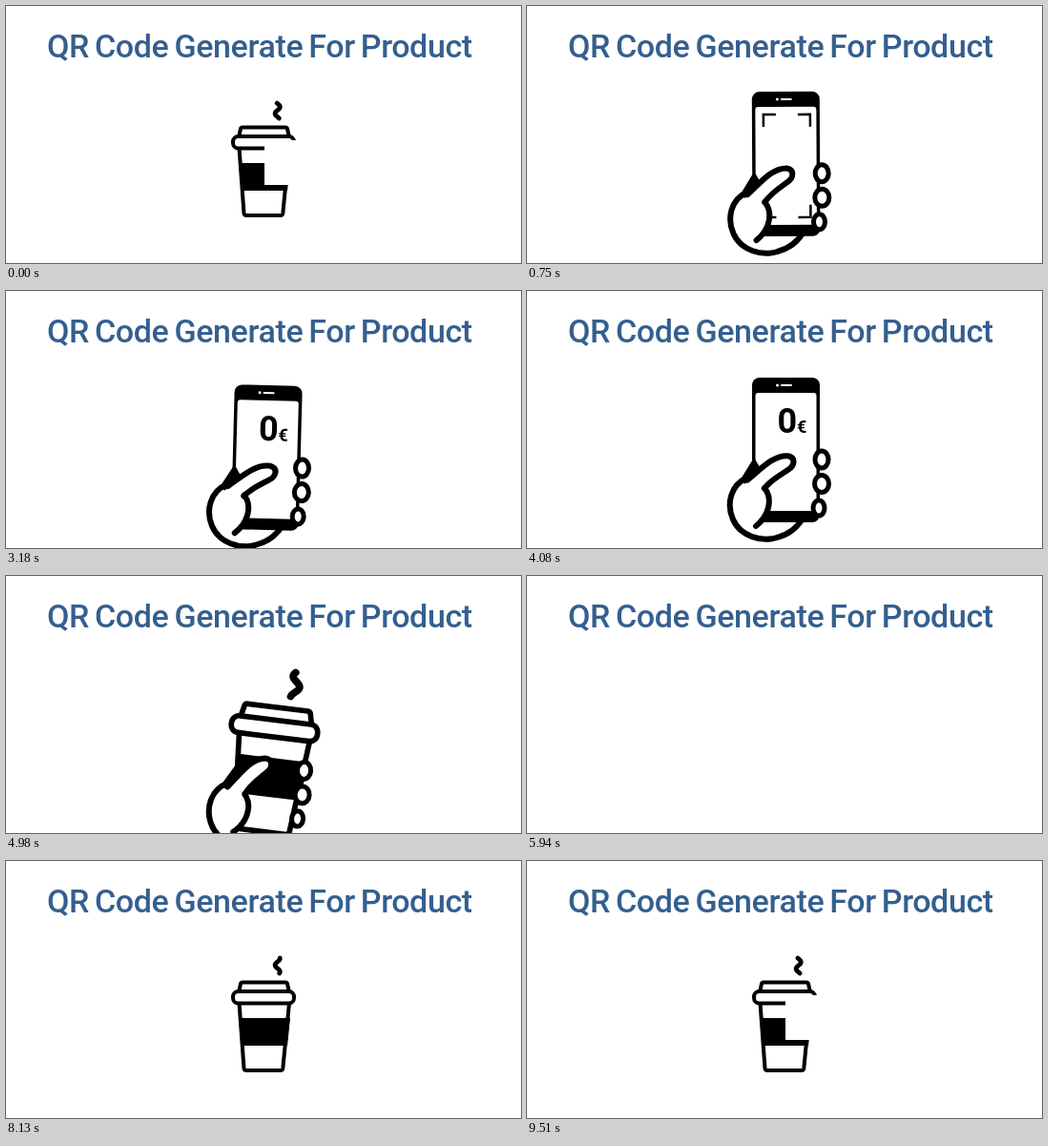
These frames come from a looping animation (540x270 px, 9.54 s). An HTML page:

```html
<!DOCTYPE html>
<html lang="en">
<head>
<meta charset="utf-8">
<title>QR Code Generate For Product</title>
<style>
  html, body { margin: 0; width: 100%; height: 100%; overflow: hidden; background: #fff; }
  svg { display: block; width: 540px; height: 270px; }
  .title { font: 500 34px Roboto, sans-serif; letter-spacing: -.4px; word-spacing: -2px; fill: #345f8f; }
  .price { font: 700 36px Roboto, sans-serif; }
  .price .unit { font-size: 18px; }
  .line { fill: none; stroke: #000; stroke-width: 4; stroke-linecap: round; stroke-linejoin: round; }
  .hand { stroke-width: 6; }
  .steam { stroke-width: 4.8; }
  .finger { stroke-width: 5; }
  .finder { stroke-width: 2.5; stroke-linecap: butt; stroke-linejoin: miter; }
  .white { fill: #fff; }
</style>
</head>
<body>
<svg viewBox="0 0 540 270">
  <defs>
    <clipPath id="stage"><rect y="80" width="540" height="190"/></clipPath>
    <g id="drink">
      <path class="line white" d="M244.500 149L249.500 218Q250 220 252 220H288Q290 220 290.300 218L297 149Z"/>
      <path d="M244 165H298L295 194H247Z"/>
      <path class="line white" d="M244 138L246 129Q246.500 127.500 248 127.500H293Q294.500 127.500 295 129L297 138Z"/>
      <rect class="line white" x="238" y="137" width="64" height="12.500" rx="5.500"/>
    </g>
  </defs>

  <text class="title" x="43" y="54">QR Code Generate For Product</text>

  <g clip-path="url(#stage)">
    <g id="cup">
      <use href="#drink"/>
      <path class="line steam"/>
      <rect id="label" class="white" x="271" y="141" width="46" height="47"/>
    </g>

    <g id="hand">
      <path class="line white hand" d="M231 200C213 208 209 228 216 244C224 262 246 268 262 263C274 260 283 253 289 243"/>
      <g id="phone">
        <rect x="236" y="95" width="71" height="152" rx="8"/>
        <rect class="white" x="239.500" y="111" width="64" height="124" rx="3"/>
        <circle class="white" cx="262.500" cy="103" r="1.500"/>
        <rect class="white" x="266" y="102" width="12" height="2" rx="1"/>
        <path id="finder" class="line finder" d="M248 132V119H261M284 119H297V132M297 214V227H284M261 227H248V214"/>
        <g id="price" class="price">
          <text x="262.500" y="153">0</text>
          <text class="unit" x="283" y="153">€</text>
        </g>
      </g>
      <g id="held" transform="translate(274.500 139) rotate(2.500) scale(1.420) translate(-270 -143)">
        <use href="#drink"/>
        <path class="line steam" transform="translate(-37 -14) scale(1.120)"/>
      </g>
      <path d="M238 179L222 205L236 208L247 194Z"/>
      <path class="white" d="M233 201L249 211C258 222 254 240 239 252L228 246L222 226L228 208Z"/>
      <path id="thumb" class="line white hand" d="M231 203C245 190 257 175 272 175.500C281 177 279 186 273 190C265 196 256 201 249 211"/>
      <path class="line hand" d="M249 211C258 222 254 240 240 251"/>
      <ellipse class="line white finger" cx="309" cy="181" rx="7" ry="9"/>
      <ellipse class="line white finger" cx="309" cy="206.500" rx="7.500" ry="9"/>
      <ellipse class="line white finger" cx="306" cy="232" rx="6" ry="8"/>
    </g>
  </g>
</svg>

<script>
const LOOP = 9540;
const SWAP = 4820; // the phone is out of view and becomes the drink
const EXIT = 5600;
const $ = id => document.getElementById(id);
const [cup, label, hand, phone, held, finder, price, thumb] =
  ['cup', 'label', 'hand', 'phone', 'held', 'finder', 'price', 'thumb'].map($);
const steams = document.querySelectorAll('.steam');

const part = (t, a, b) => Math.min(1, Math.max(0, (t - a) / (b - a)));
const ease = (t, a, b) => (1 - Math.cos(Math.PI * part(t, a, b))) / 2;
const pulse = (t, a, b) => Math.sin(Math.PI * part(t, a, b));

// Damped swing from 1 to 0 with one small overshoot.
function settle(t, a, b) {
  const p = part(t, a, b);
  return p < 1 ? Math.exp(-7.5 * p) * Math.cos(2.5 * Math.PI * p) : 0;
}

const move = (el, value) => el.setAttribute('transform', value);
const show = (el, on) => el.style.display = on ? '' : 'none';
const scaleAt = (x, y, s, dy = 0) => `translate(${x} ${y + dy}) scale(${s}) translate(${-x} ${-y})`;

function steamPath(t) {
  let d = '';
  for (let y = 102; y <= 118; y++) {
    const x = 284.7 + 2.6 * Math.sin(2 * Math.PI * ((y - 102.5) / 14 + 5 * t / LOOP));
    d += `${d ? 'L' : 'M'}${x.toFixed(2)} ${y}`;
  }
  return d;
}

// How far the hand is out of view: 0 in place, 1 below the stage.
function handAway(t) {
  if (t < 4650) return settle(t, 30, 1560);
  if (t < SWAP) return ease(t, 4650, SWAP);
  return t < EXIT ? settle(t, SWAP, 5720) : ease(t, EXIT, 5940);
}

function drawHand(t) {
  const holding = t >= SWAP;
  const away = handAway(t);
  const nod = pulse(t, 2700, 3660);
  const x = -20 * away;
  const y = 200 * away + 3.5 * nod - 4 * pulse(t, 3660, 4470) + (holding ? 10 : 0);
  const turn = 12 * away + 1.5 * nod + pulse(t, 1740, 2670) + (holding ? 4 + 2 * pulse(t, 4980, EXIT) : 0);

  show(hand, t >= 30 && t < 5940);
  move(hand, `translate(${x} ${y}) rotate(${turn} 250 240)`);
  move(thumb, `rotate(${holding ? -8 : 7 * pulse(t, 1740, 4470)} 240 208)`);
  show(phone, !holding);
  show(held, holding);
  show(finder, t < 1850);
  show(price, t > 1950);
  move(price, scaleAt(277, 141, 1 - settle(t, 1950, 2670)));
}

function drawCup(t) {
  const first = t < 1000;
  const drop = first ? 0 : settle(t, 6480, 7600);
  const pop = first ? 0 : settle(t, 8430, 9500);
  show(cup, first || t >= 6480);
  move(cup, scaleAt(270, 180, 1 - .7 * drop, 180 * drop));
  show(label, first || t > 8430);
  move(label, scaleAt(294, 164, 1 - pop, 10 * pop));
}

function draw(t) {
  drawCup(t);
  drawHand(t);
  const d = steamPath(t);
  steams.forEach(s => s.setAttribute('d', d));
}

const start = performance.now();
function tick() {
  draw((performance.now() - start) % LOOP);
  requestAnimationFrame(tick);
}
draw(0);
requestAnimationFrame(tick);
</script>
</body>
</html>
```
